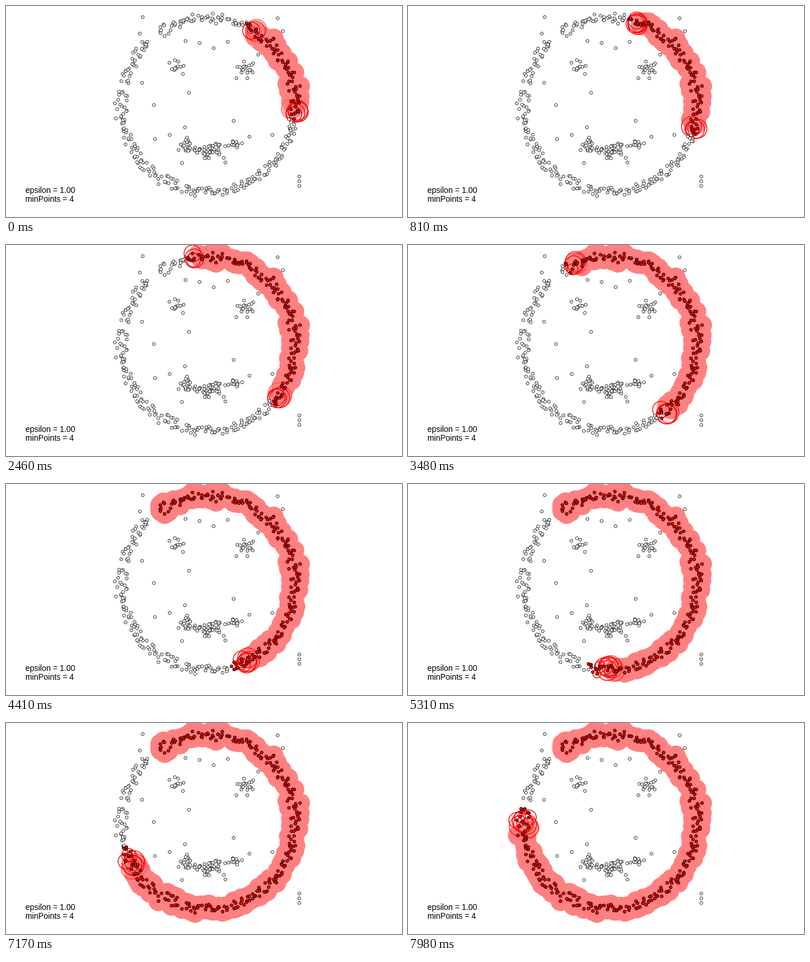
A matplotlib script for the animation above (8000 ms loop, 675 by 360 pixels).

```python
import numpy as np
import matplotlib.pyplot as plt
from matplotlib.animation import FuncAnimation

W, H, DPI = 675, 360, 100
PX = 72 / DPI                     # points per pixel
LOOP, TICK, STEP = 8000, 20, 30   # ms
CENTER, RADIUS = np.array([345, 169]), 148.5
EPS = 17
GROW, FADE, LEAD = 230, 140, 200  # ms
RED, PINK = (1, 0, 0), (1, 0.5, 0.5)

rng = np.random.default_rng(11)

# Eyes and mouth as clumps: x, y, spread x, spread y, count
CLUMPS = [(289, 105, 9, 7, 14), (407, 107, 8, 9, 20),
          (308, 239, 10, 8, 23), (353, 247, 13, 7, 43), (388, 236, 8, 3, 11)]
STRAYS = [(233, 19), (228, 47), (463, 21), (472, 43), (454, 220), (232, 131),
          (252, 169), (254, 227), (312, 148), (388, 196), (430, 83),
          (305, 207), (279, 220), (415, 223), (300, 268), (374, 267)]


def ring(n=352):
    """Jittered ring with two breaks: clockwise angles from the top, places."""
    ang = 360 * (np.arange(n) + rng.normal(0, 1.3, n)) / n - 36
    ang = ang[(ang > -34) & (ang < 318) & (np.abs(ang - 282.5) > 2)]
    r = RADIUS + rng.normal(0, 4.8, len(ang)).clip(-9, 11)
    a = np.radians(ang)
    return ang, CENTER + np.column_stack([r * np.sin(a), -r * np.cos(a)])


def clump(x, y, sx, sy, n):
    return (x, y) + rng.normal(0, 1, (n, 2)).clip(-1.8, 1.8) * (sx, sy)


def reach_time(ang):
    """When each angle is searched; the lower front speeds up once alone."""
    upper = 63 * (28 - ang)
    lower = np.minimum(75 * (ang - 97), 4200 + 30.8 * (ang - 153))
    t = np.where(ang < 62, upper, lower)
    return np.where(ang > 282, np.inf, t)


angles, core = ring()
core_t = reach_time(angles) + rng.uniform(-50, 50, len(core))
brow = [(306 + 24 * k, 65 + 7 * np.sin(2 * k + 4)) for k in range(4)]
column = [(500, 291 + 8 * k) for k in range(3)]
points = np.vstack([core, STRAYS, brow, column] + [clump(*c) for c in CLUMPS])
red_t = np.full(len(points), np.inf)
red_t[:len(core)] = core_t - LEAD

fig = plt.figure(figsize=(W / DPI, H / DPI), dpi=DPI, facecolor="white")
ax = fig.add_axes([0, 0, 1, 1])
ax.set(xlim=(0, W), ylim=(H, 0))
ax.axis("off")


def area(radius):
    return (2 * radius * PX) ** 2


fills = ax.scatter([], [], s=area(EPS), linewidths=0, zorder=1)
rings = ax.scatter([], [], facecolors="none", linewidths=1.4 * PX, zorder=2)
dots = ax.scatter(*points.T, s=area(2.5), linewidths=0.95 * PX, zorder=3)

for y, label in ((319, "epsilon = 1.00"), (334, "minPoints = 4")):
    ax.text(33, y, label, family="Liberation Sans", size=13.6 * PX,
            color="black", va="baseline")


def rgba(rgb, alpha):
    return np.column_stack([np.tile(rgb, (len(alpha), 1)), alpha])


def draw(i):
    t = i * TICK // STEP * STEP
    age = t - core_t
    fade = np.clip((age - GROW) / FADE, 0, 1)

    filled = age > GROW
    fills.set_offsets(core[filled])
    fills.set_facecolors(rgba(PINK, fade[filled]))

    live = (age > 0) & (age < GROW + FADE)
    grow = np.clip(age[live] / GROW, 0, 1)
    rings.set_offsets(core[live])
    rings.set_sizes(area(EPS * (1 - (1 - grow) ** 3)))
    rings.set_edgecolors(rgba(RED, 1 - fade[live]))

    found = (red_t <= t)[:, None]
    dots.set_facecolors(np.where(found, RED, (1, 1, 1)))
    dots.set_edgecolors(np.where(found, (0.1, 0, 0), (0.2, 0.2, 0.2)))
    return fills, rings, dots


anim = FuncAnimation(fig, draw, frames=LOOP // TICK, interval=TICK,
                     repeat=True, repeat_delay=0)
plt.show()
```
